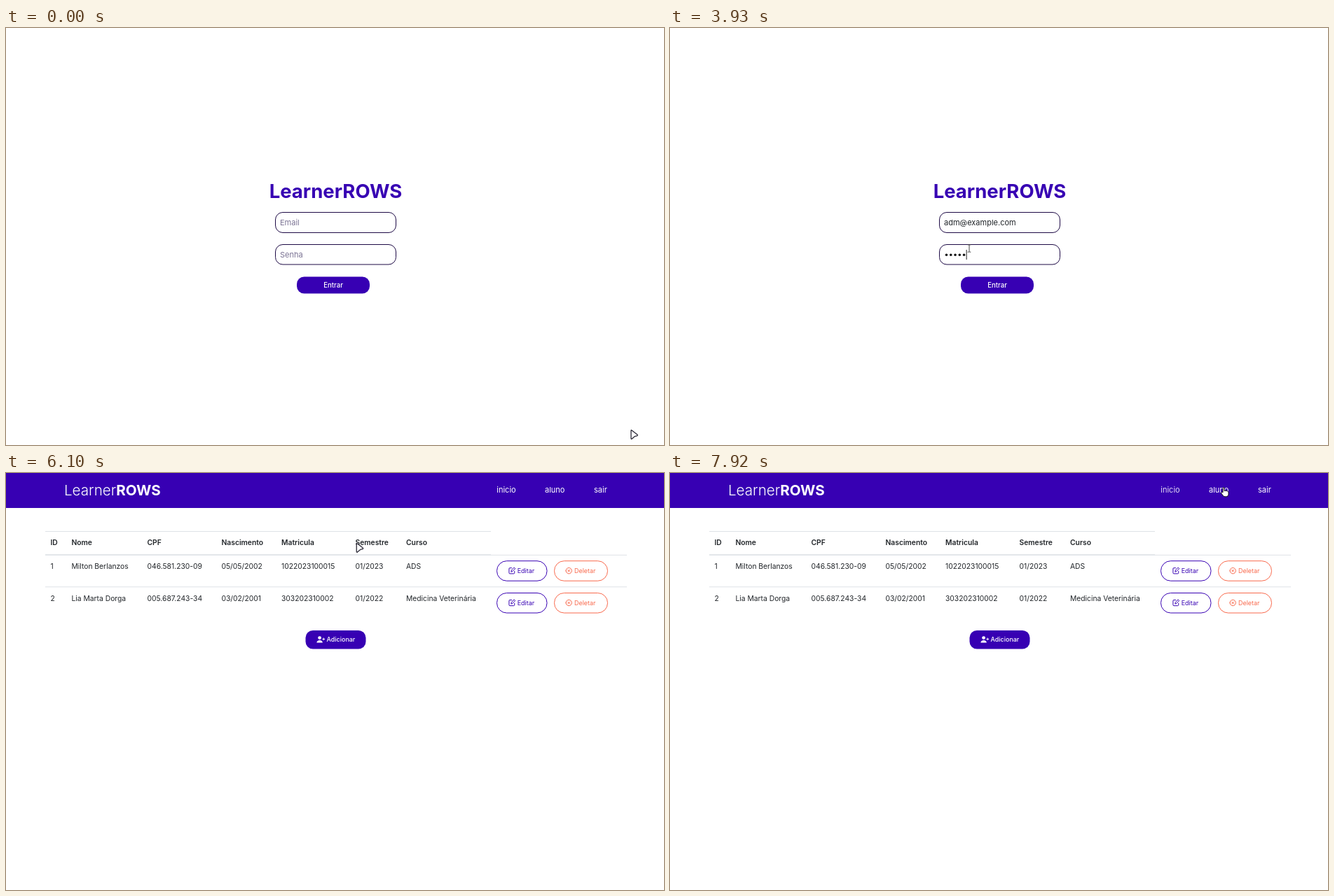
Write an HTML page that moves like this. It is 939 px wide and 596 px high and loops after 7990 ms.

```html
<!DOCTYPE html>
<html lang="pt-BR">
<head>
<meta charset="utf-8">
<title>LearnerROWS</title>
<style>
  html, body { margin: 0; width: 100%; height: 100%; overflow: hidden; background: #fff; }
  svg { display: block; font-family: Inter, sans-serif; font-size: 10.3px; fill: #212529; }
  .title { font-size: 27.5px; font-weight: 700; fill: #3700b3; text-anchor: middle; }
  .field { fill: #fff; stroke: #1d0a45; }
  .input { font-size: 11px; }
  .hint { fill: #7b7394; }
  .solid { fill: #3700b3; }
  .solid.hover { fill: #5f33c2; }
  .label { font-size: 9.63px; font-weight: 500; fill: #fff; }
  .small { font-size: 8.94px; }
  .nav { font-size: 11px; fill: #fff; }
  .brand { font-size: 20.6px; font-weight: 300; fill: #fff; }
  .bold { font-weight: 700; }
  .head { font-weight: 600; }
  .rule { stroke: #dee2e6; }
  .line { fill: none; stroke: currentColor; }
  .edit { color: #3700b3; }
  .delete { color: #f9694c; }
  .edit text, .delete text { fill: currentColor; }
  .icon { fill: none; stroke: currentColor; stroke-linecap: round; stroke-linejoin: round; }
</style>
</head>
<body>
<svg width="939" height="596" viewBox="0 0 939 596">
  <g id="login">
    <text class="title" x="470.5" y="242.7">LearnerROWS</text>
    <rect class="field beam" x="384.5" y="263.5" width="172" height="29" rx="10.5"/>
    <rect class="field beam" x="384.5" y="309.5" width="172" height="28.5" rx="10.5"/>
    <text id="emailHint" class="input hint" x="391" y="282.2">Email</text>
    <text id="email" class="input" x="391" y="282.2">adm@example.com</text>
    <text id="passHint" class="input hint" x="391" y="328">Senha</text>
    <g id="dots" fill="#111"></g>
    <rect id="enter" class="solid hand" x="415" y="355.5" width="104" height="24" rx="10.5"/>
    <text class="label" x="467" y="371.2" text-anchor="middle">Entrar</text>
    <rect id="caret" width="1" height="14" fill="#222"/>
  </g>

  <g id="list">
    <rect class="solid" width="939" height="50"/>
    <text class="brand" x="83" y="32">Learner<tspan class="bold">ROWS</tspan></text>
    <rect class="hand" x="700" y="14" width="28" height="20" fill="none"/>
    <rect class="hand" x="769" y="14" width="29" height="20" fill="none"/>
    <text id="home" class="nav" x="700.3" y="28.4">inicio</text>
    <text class="nav" x="769" y="28.4">aluno</text>
    <text class="nav" x="839" y="28.4">sair</text>
    <path class="rule" d="M56 83.5H692M56 117.3H886M56 162.8H886M56 116.7H692"/>
    <g id="table"></g>
    <rect id="add" class="solid hand" x="427.5" y="225" width="86" height="26.5" rx="10.5"/>
    <g fill="#fff">
      <circle cx="447.6" cy="235.6" r="2.4"/>
      <path d="M443.4 242.6C443.4 237.8 451.8 237.8 451.8 242.6Z"/>
      <path d="M451.4 237.4H455M453.2 235.6V239.2" stroke="#fff"/>
    </g>
    <text class="label small" x="457.6" y="241.3">Adicionar</text>
  </g>

  <g id="cursor">
    <path id="arrow" fill="#fff" stroke="#2c2a38" stroke-width="1.3" stroke-linejoin="round"
      d="M1 1.2C1 .6 1.6 .5 2 .9L10 7.3C10.6 7.9 10.4 8.6 9.6 8.8L6.5 9.6 2.2 13.3C1.6 13.7 1 13.5 1 12.8Z"/>
    <path id="beam" fill="none" stroke="#444"
      d="M-2.3 -5.2H-.8L0 -4.7 .8 -5.2H2.3M0 -4.7V4.7M-2.3 5.2H-.8L0 4.7 .8 5.2H2.3"/>
    <path id="hand" fill="#fff" stroke="#111" stroke-linejoin="round"
      d="M-1 8V1.6C-1 .2 1 .2 1 1.6V5.6C3 5 7 5.6 7 8V10C7 12.5 5.5 13.8 3.5 13.8H2C0 13.8 -1.5 11.5 -3.2 9C-4 7.6 -2.4 6.8 -1 8Z"/>
  </g>
</svg>

<script>
const LOOP = 7990;
const FILL_EMAIL = 1330, FOCUS_PASS = 1835, CLICK_ENTER = 5140, OPEN_LIST = 5830, LEAVE_HOME = 7430;
const BLINK = 530, DOT = 6.27, LEFT = 391.3;
const PASS_LENGTH = 8, FIRST_KEY = 2910, KEY_GAP = 243;

const $ = id => document.getElementById(id);
const show = (el, on) => el.setAttribute('visibility', on ? 'visible' : 'hidden');

// Table
const columns = [63.5, 93.5, 201.5, 307.5, 393, 498.5, 571];
const head = ['ID', 'Nome', 'CPF', 'Nascimento', 'Matricula', 'Semestre', 'Curso'];
const students = [
  ['1', 'Milton Berlanzos', '046.581.230-09', '05/05/2002', '1022023100015', '01/2023', 'ADS'],
  ['2', 'Lia Marta Dorga', '005.687.243-34', '03/02/2001', '303202310002', '01/2022', 'Medicina Veterinária']
];

const pencil = 'M21 10H18.5Q17.4 10 17.4 11.2V17Q17.4 18.2 18.5 18.2H24Q25.2 18.2 25.2 17V14.8' +
  'M20.4 15.2L21 13 24.6 9.4 26.2 11 22.6 14.6Z';
const crossed = 'M16.5 14a4.2 4.2 0 1 0 8.4 0a4.2 4.2 0 1 0 -8.4 0' +
  'M19.3 12.6L22.1 15.4M22.1 12.6L19.3 15.4';

const line = (cells, y, kind) => cells.map((cell, c) =>
  `<text class="${kind}" x="${columns[c]}" y="${y}">${cell}</text>`).join('');

const button = (kind, x, y, width, textX, label, icon) => `
  <g class="${kind}" transform="translate(${x} ${y})">
    <rect class="line" width="${width}" height="28.5" rx="14"/>
    <path class="icon" d="${icon}"/>
    <text class="small" x="${textX}" y="17.5">${label}</text>
  </g>`;

$('table').innerHTML = line(head, 103, 'head') + students.map((cells, i) => {
  const y = 125.7 + i * 45.8;
  return line(cells, y + 11.1, 'cell') +
    button('edit', 700.5, y, 71.5, 29.2, 'Editar', pencil) +
    button('delete', 782.5, y, 76, 28.5, 'Deletar', crossed);
}).join('');

$('dots').innerHTML = Array.from({ length: PASS_LENGTH }, (_, i) =>
  `<circle cx="${394.5 + i * DOT}" cy="324.3" r="1.75"/>`).join('');

// Pointer moves: start, end, x, y
const START = [891, 574];
const moves = [
  [60, 130, 699, 329], [320, 400, 699, 321], [600, 1000, 449, 268], [1414, 1751, 428, 317],
  [2120, 2190, 427, 315], [4870, 5140, 448, 364], [5475, 5680, 456, 296], [5680, 6055, 490, 93],
  [6055, 6430, 713, 257], [6500, 6630, 735, 279], [6770, 6908, 520.5, 135.5], [6908, 7070, 480, 234],
  [7130, 7430, 716, 22], [7430, 7530, 768, 16], [7590, 7920, 790, 20]
];

const ease = k => k * k * (3 - 2 * k);

function pointerAt(t) {
  let [x, y] = START;
  for (const [start, end, toX, toY] of moves) {
    if (t < start) break;
    const k = ease(Math.min(1, (t - start) / (end - start)));
    x += (toX - x) * k;
    y += (toY - y) * k;
  }
  return { x, y };
}

const value = (el, name) => el[name].baseVal.value;
const over = (el, { x, y }) =>
  x >= value(el, 'x') && x <= value(el, 'x') + value(el, 'width') &&
  y >= value(el, 'y') && y <= value(el, 'y') + value(el, 'height');

function drawCaret(t, typed) {
  const inEmail = t < FOCUS_PASS;
  const emailWidth = t < FILL_EMAIL ? 0 : $('email').getComputedTextLength();
  $('caret').setAttribute('x', LEFT + (inEmail ? emailWidth : typed * DOT));
  $('caret').setAttribute('y', inEmail ? 271 : 317);

  const lastKey = typed ? FIRST_KEY + (typed - 1) * KEY_GAP : FOCUS_PASS - 240;
  const lit = inEmail || Math.floor((t - lastKey) / BLINK) % 2 === 0;
  show($('caret'), t >= 1000 && t < CLICK_ENTER && lit);
}

function draw(t) {
  const page = t < OPEN_LIST ? 'login' : 'list';
  for (const id of ['login', 'list']) $(id).style.display = id === page ? '' : 'none';

  const typed = Math.max(0, Math.min(PASS_LENGTH, Math.floor((t - FIRST_KEY) / KEY_GAP) + 1));
  show($('emailHint'), t < FILL_EMAIL);
  show($('email'), t >= FILL_EMAIL);
  show($('passHint'), !typed);
  [...$('dots').children].forEach((dot, i) => show(dot, i < typed));
  drawCaret(t, typed);

  const pointer = pointerAt(t);
  const find = kind => [...$(page).querySelectorAll('.' + kind)].some(el => over(el, pointer));
  const shape = ['beam', 'hand'].find(find) || 'arrow';
  $('cursor').setAttribute('transform', `translate(${pointer.x} ${pointer.y})`);
  for (const id of ['arrow', 'beam', 'hand']) show($(id), id === shape);

  $('enter').classList.toggle('hover', t >= CLICK_ENTER || over($('enter'), pointer));
  $('add').classList.toggle('hover', over($('add'), pointer));
  $('home').setAttribute('opacity', t >= LEAVE_HOME ? 0.85 : 1);
}

const begin = performance.now();
function tick() {
  draw((performance.now() - begin) % LOOP);
  requestAnimationFrame(tick);
}
tick();
</script>
</body>
</html>
```
